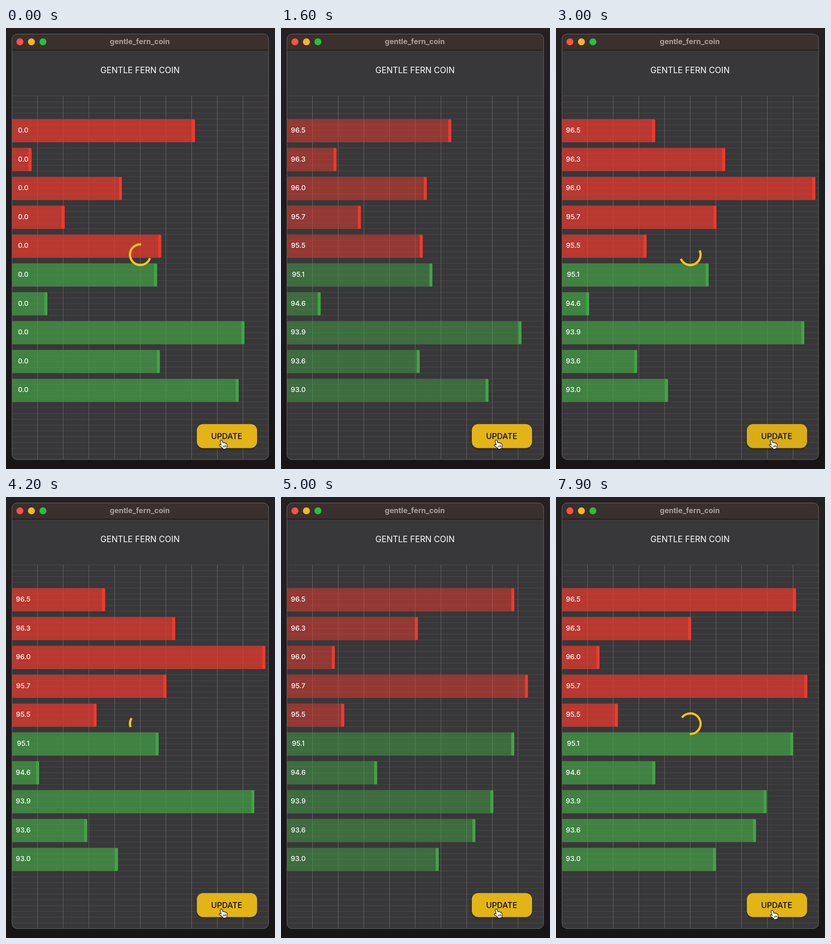
Recreate the animation shown at these times as an HTML page. Size 585 px wide and 957 px high, loop 8000 ms.

```html
<!DOCTYPE html>
<html lang="en">
<head>
<meta charset="utf-8">
<title>Bar chart</title>
<style>
html, body { margin: 0; width: 100%; height: 100%; overflow: hidden; background: #1e1c1d; }
svg { display: block; width: 585px; height: 957px; }
text { font-family: Inter, "Open Sans", sans-serif; text-anchor: middle; }
.label { font-size: 15px; font-weight: 500; fill: #fff; }
</style>
</head>
<body>
<svg viewBox="0 0 585 957">
  <defs>
    <linearGradient id="desk" x2="0" y2="1">
      <stop offset="0" stop-color="#232122"/>
      <stop offset="1" stop-color="#171516"/>
    </linearGradient>
    <filter id="shade" x="-20%" y="-20%" width="140%" height="150%">
      <feDropShadow dx="0" dy="2" stdDeviation="2" flood-opacity=".4"/>
    </filter>
    <clipPath id="frame"><rect x="13" y="13" width="558" height="923.5" rx="11"/></clipPath>
  </defs>
  <rect width="585" height="957" fill="url(#desk)"/>
  <g clip-path="url(#frame)">
    <rect x="13" y="13" width="558" height="924" fill="#383739"/>
    <rect x="13" y="13" width="558" height="35" fill="#3a302d"/>
    <rect x="13" y="47.5" width="558" height="1.2" fill="#121011"/>
    <path id="rows" stroke="#4b4a4b"/>
    <path id="columns" stroke="#6a696a"/>
    <g id="bars"></g>
  </g>
  <rect x="13" y="13" width="558" height="923.5" rx="11" fill="none" stroke="#6c6a6a"/>
  <circle cx="30.3" cy="30" r="7.6" fill="#fe5148"/>
  <circle cx="55.3" cy="30" r="7.6" fill="#f8b42b"/>
  <circle cx="80.3" cy="30" r="7.6" fill="#29c03a"/>
  <text x="291" y="35" font-size="16" font-weight="700" fill="#aaa3a1">gentle_fern_coin</text>
  <text x="291.5" y="98" font-size="18" fill="#fff">GENTLE FERN COIN</text>
  <path id="spinner" fill="none" stroke="#fcc41d" stroke-width="4.8"/>
  <rect x="415" y="859.5" width="131" height="52" rx="14" fill="#e2b417" filter="url(#shade)"/>
  <rect id="press" x="415" y="859.5" width="131" height="52" rx="14"/>
  <text x="480" y="892" font-size="17.2" font-weight="500" fill="#0b0a06">UPDATE</text>
  <path id="hand" fill="#fff" stroke="#111" stroke-width="1.2" stroke-linejoin="round"
    d="M4 1.4C5.6.6 7 1.6 7.4 3L8.6 7.2C9.6 6.2 11.2 6.5 11.7 7.6C13 6.9 14.3 7.4 14.7 8.5C16.2 8 17.2 8.8 17.6 10.2C18.4 13 18.4 15 17.2 17.2L17.6 19.4L9.8 21L8.8 19.2C6.4 17.6 4.4 15.4 1.6 13.7C-.2 12.3 1 10.5 2.9 11.1L5.2 12.3L3 4.6C2.6 3.2 2.8 2 4 1.4ZM9.8 13.4l.9 3.8M12.2 12.9l.9 3.8M14.6 12.4l.9 3.8"/>
</svg>
<script>
const LOOP = 8000, STEP = 100, MOVE = 1000;
const LEFT = 13, TOP = 198, PITCH = 62.6, BAR = 50;
const VALUES = [96.5, 96.3, 96, 95.7, 95.5, 95.1, 94.6, 93.9, 93.6, 93];
// Right edges of the bars before, between and after the updates
const EDGES = [
  [411, 55.5, 252, 127.5, 337.5, 328.5, 90, 518.5, 334.5, 506],
  [215.5, 368, 564, 349, 197, 332, 72, 540, 176.5, 243.5],
  [522, 294, 94.5, 546.5, 134.5, 516, 216, 458, 435, 348]
];
const LOADS = [[-478, 1525], [2714, 4363], [6172, 9000]];

const $ = id => document.getElementById(id);
const clamp = x => Math.max(0, Math.min(1, x));
const easeOut = x => 1 - (1 - clamp(x)) ** 3;

function add(parent, tag, attrs) {
  const el = document.createElementNS("http://www.w3.org/2000/svg", tag);
  for (const key in attrs) el.setAttribute(key, attrs[key]);
  return parent.appendChild(el);
}

let grid = "";
for (let y = 147.4; y < 936; y += 12.53) grid += `M13 ${y}H571`;
$("rows").setAttribute("d", grid);
grid = "";
for (let i = 1; i < 10; i++) grid += `M${12.6 + i * 55.87} 147V937`;
$("columns").setAttribute("d", grid);

const bars = VALUES.map((value, i) => {
  const y = TOP + i * PITCH, fill = i < 5 ? "#f0392d" : "#43a346";
  return {
    y, value,
    body: add($("bars"), "path", { fill }),
    tip: add($("bars"), "rect", { y, width: 6.5, height: BAR, rx: 2.6, fill }),
    label: add($("bars"), "text", { x: 37.5, y: y + 29, class: "label" })
  };
});

// cubic-bezier(.4, 0, .2, 1), solved by bisection
function fastOutSlowIn(x) {
  x = clamp(x);
  let lo = 0, hi = 1, u = .5;
  for (let i = 0; i < 24; i++) {
    u = (lo + hi) / 2;
    const at = 1.2 * u * (1 - u) ** 2 + .6 * u * u * (1 - u) + u ** 3;
    if (at < x) lo = u; else hi = u;
  }
  return u * u * (3 - 2 * u);
}

// Material style spinner: the arc grows and shrinks in 1333 ms and turns in 2222 ms
function spinnerPath(age) {
  const s = age % 1333 / 1333;
  const head = fastOutSlowIn(s * 2), tail = fastOutSlowIn(s * 2 - 1);
  const from = Math.PI * (-.5 + 1.5 * tail + 2 * age / 2222 + .5 * s);
  const sweep = Math.max(.001, 1.5 * Math.PI * (head - tail));
  const point = a => `${292 + 22.4 * Math.cos(a)} ${492 + 22.4 * Math.sin(a)}`;
  return `M${point(from)}A22.4 22.4 0 ${sweep > Math.PI ? 1 : 0} 1 ${point(from + sweep)}`;
}

function draw(t) {
  const done = LOADS.filter(load => t >= load[1]);
  const n = done.length;
  const age = n ? t - done[n - 1][1] : MOVE;
  const moving = age < MOVE, k = easeOut(age / MOVE);

  bars.forEach((bar, i) => {
    const from = EDGES[Math.max(0, n - 1)][i];
    const edge = from + (EDGES[n][i] - from) * k;
    bar.body.setAttribute("d",
      `M${LEFT} ${bar.y}H${edge - 3}q3 0 3 3v${BAR - 6}q0 3-3 3H${LEFT}z`);
    bar.body.setAttribute("opacity", moving ? .49 : .7);
    bar.tip.setAttribute("x", edge - 6.5);
    bar.label.textContent = (n ? bar.value : 0).toFixed(1);
  });

  const load = LOADS.find(([start, end]) => t >= start && t < end);
  $("spinner").setAttribute("d", load ? spinnerPath(t - load[0]) : "");

  const pressed = LOADS.some(([start]) => t > start - 100 && t < start + 400);
  $("press").setAttribute("opacity", pressed ? .04 : 0);

  const drift = clamp((t - 7200) / 300);
  $("hand").setAttribute("transform", `translate(${463 + 2 * drift} ${893 + 3 * drift})`);
}

let begin = null;
function tick(now) {
  if (begin === null) begin = now;
  const t = (now - begin) % LOOP;
  draw(Math.floor(t / STEP) * STEP);
  requestAnimationFrame(tick);
}
draw(0);
requestAnimationFrame(tick);
</script>
</body>
</html>
```
